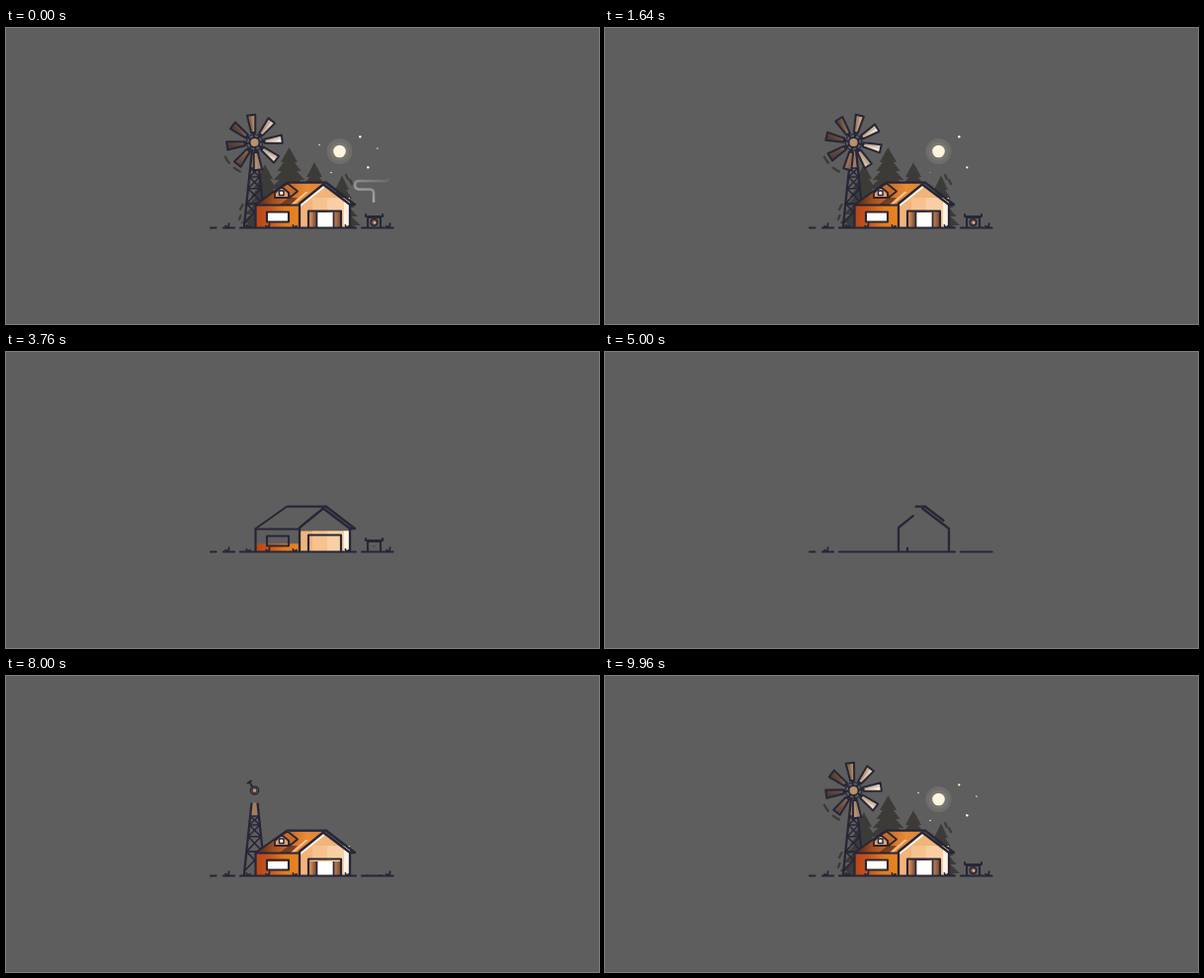
These frames come from a looping animation (600 by 300 pixels, 10000 ms). An HTML page with a canvas:

```html
<!DOCTYPE html>
<html>
<head>
<meta charset="utf-8">
<style>
html, body { margin: 0; width: 100%; height: 100%; overflow: hidden; background: #5e5e5e; }
canvas { display: block; }
</style>
</head>
<body>
<canvas id="stage" width="600" height="300"></canvas>
<script>
const ctx = document.getElementById('stage').getContext('2d');
const INK = '#272638', SHADE = '#3c3b38', BG = '#5e5e5e', CREAM = '#fff4e3';
const BASE = 202, EAVE = 179, RIDGE = 156.7;         // heights
const LEFT = 252.5, CORNER = 297, PEAK = 322, RIGHT = 348; // house columns
const HUB = { x: 251.5, y: 116 };
let t = 0;

const ramp = (start, dur) => {
  const x = Math.max(0, Math.min(1, (t - start) / dur));
  return x * x * (3 - 2 * x);
};

// Presence of a part: the loop first clears the scene, then builds it again
const shown = (enter, leave, dur = .5, leaveDur = dur) =>
  t < 6 ? 1 - ramp(leave, leaveDur) : ramp(enter, dur);

function trace(points) {
  ctx.beginPath();
  points.forEach(([x, y]) => ctx.lineTo(x, y));
}

function line(points, p = 1, width = 2.2, color = INK) {
  if (p <= 0) return;
  const len = points.slice(1).reduce((sum, [x, y], i) =>
    sum + Math.hypot(x - points[i][0], y - points[i][1]), 0);
  ctx.setLineDash(p < 1 ? [len * p, len * 2] : []);
  ctx.strokeStyle = color;
  ctx.lineWidth = width;
  trace(points);
  ctx.stroke();
  ctx.setLineDash([]);
}

function fill(points, color) {
  ctx.fillStyle = color;
  trace(points);
  ctx.fill();
}

function disc(x, y, r, color) {
  ctx.fillStyle = color;
  ctx.beginPath();
  ctx.arc(x, y, r, 0, 7);
  ctx.fill();
}

const box = (x, y, w, h) => [[x, y], [x + w, y], [x + w, y + h], [x, y + h], [x, y]];

function across(x1, x2, ...colors) {
  const g = ctx.createLinearGradient(x1, 0, x2, 0);
  colors.forEach((c, i) => g.addColorStop(i / (colors.length - 1), c));
  return g;
}

// Shows a drawing from the ground up to a share of its height
function wipe(p, top, draw) {
  if (p <= 0) return;
  ctx.save();
  ctx.beginPath();
  ctx.rect(0, BASE + 1 - (BASE + 1 - top) * p, 600, 300);
  ctx.clip();
  draw();
  ctx.restore();
}

function tree(x, top, width, p) {
  if (p <= 0) return;
  ctx.save();
  ctx.beginPath();
  ctx.rect(0, 0, 600, BASE);
  ctx.clip();
  ctx.translate(x, top + (BASE - top) * (1 - p));
  for (let y = 0, w = width; top + y < BASE; y += 9, w += width * .42)
    fill([[0, y - w * .35], [w, y + 12], [-w, y + 12]], SHADE);
  ctx.restore();
}

function trees() {
  [[262, 141, 8], [286.5, 124, 8.5], [312, 139, 8], [340, 152, 7]].forEach(([x, top, width], i) =>
    tree(x, top, width, shown(8.4 + .05 * Math.max(0, i * 2 - 2), 2.6 - .04 * i)));

  // Short marks around the wheel and beside the outer trees
  const p = shown(9.5, 2.45, .35);
  for (let i = 0; i < 2; i++) {
    const a = 2.68 - i * .43, end = a - .22 * p;
    if (p > 0) {
      ctx.strokeStyle = SHADE;
      ctx.lineWidth = 2.3;
      ctx.beginPath();
      ctx.arc(HUB.x, HUB.y, 33, end, a);
      ctx.stroke();
    }
    line([[239.5 - 2 * i, 179 + 11 * i], [237 - i, 184 + 10 * i]], p, 2.2, SHADE);
    line([[344 + 4 * i, 149 + 5 * i], [346 + 4 * i, 153 + 5 * i]], p, 2.2, SHADE);
  }
}

function sky() {
  const m = shown(8.95, 2.7);
  disc(337.5, 125, 13 * m, 'rgba(255,245,215,.10)');
  disc(337.5, 125, 9.6 * m, 'rgba(255,245,215,.07)');
  disc(337.5, 125, 6.3 * m, '#fcf4de');
  [[375.8, 122], [317, 118.5], [329, 146.5], [366.3, 141.3], [358.3, 110.3]].forEach(([x, y], i) =>
    disc(x, y, (i > 2 ? 1.2 : .75) * shown(9.2 + i * .08, .1 + .45 * i, .5, 1.3), '#fff8e6'));
}

function smoke() {
  const path = new Path2D('M372 187V167Q372 163.500 368 163.500H358Q353 163.500 353 159T358 155H383Q388 155 388 150T383 145H365');
  const len = 100;
  const head = t < 6 ? 1 : ramp(8.54, .55);
  const tail = t < 6 ? .05 + .95 * ramp(-.1, .7) : ramp(8.95, .55);
  if (head <= tail) return;
  ctx.setLineDash([len * (head - tail), 300]);
  ctx.lineDashOffset = -len * tail;
  const g = ctx.createLinearGradient(364, 187, 378, 147);
  ['#b4b4b4', '#a6a6a6', '#888888', BG].forEach((c, i) => g.addColorStop(i / 3, c));
  ctx.strokeStyle = g;
  ctx.lineWidth = 2.5;
  ctx.lineCap = 'butt';
  ctx.stroke(path);
  ctx.lineCap = 'round';
  ctx.setLineDash([]);
  ctx.lineDashOffset = 0;
}

function tower() {
  const leg = (side, y) => [HUB.x + side * (2.5 + (y - 124) * .105), y];
  wipe(shown(7.6, 3.2), 120, () => {
    fill([leg(-1, 124), leg(1, 124), leg(1, 142), leg(-1, 142)], '#a27d5b');
    for (const side of [-1, 1]) line([leg(side, BASE), leg(side, 124)], 1, 2.3);
    for (let y = 142, h = 9; y < 195; y += h, h *= 1.3) {
      const next = Math.min(y + h, BASE);
      line([leg(-1, y), leg(1, y), leg(-1, next)], 1, 1.6);
      line([leg(-1, y), leg(1, next)], 1, 1.6);
    }
  });
}

function wheel() {
  const turn = (-7 + 12.2 * (t > 6 ? t - 10 : t)) * Math.PI / 180;
  const wood = across(223, 280, '#4a3b33', '#684f41', '#b08a68', '#e0c8ac', '#fbf6f0');
  for (let i = 0; i < 8; i++) {
    const p = shown(8 + i * .025, 2.6 + i * .025, .33);
    if (p <= 0) continue;
    const a = turn + i * Math.PI / 4, c = Math.cos(a), s = Math.sin(a);
    const at = (x, y) => [HUB.x + x * c + y * s, HUB.y + x * s - y * c];
    const out = 10 + 18 * p, w = 2 + 2.2 * p;
    const blade = [at(-2, 10), at(-w, out), at(w, out), at(2, 10), at(-2, 10)];
    fill(blade, wood);
    fill([at(-2, 10), at(-w, out), at(0, out), at(0, 10)], 'rgba(50,38,40,.18)');
    line(blade, 1, 2);
    line([at(0, 5), at(0, 10)], 1, 2);
  }
  const h = shown(7.75, 2.85);
  if (h <= 0) return;
  ctx.strokeStyle = INK;
  ctx.lineWidth = 1.3;
  ctx.beginPath();
  ctx.arc(HUB.x, HUB.y, 8.3 * h, 0, 7);
  ctx.stroke();
  disc(HUB.x, HUB.y, 5.8 * h, INK);
  disc(HUB.x, HUB.y, 4 * h, '#b8926b');
}

function dormer() {
  const front = [[272, 172], [272, 167], [279, 161], [286, 167], [286, 172], [272, 172]];
  const side = [[279, 161], [285, 157.5], [295, 165.5], [287, 172], [286, 167]];
  fill(side, '#c96a28');
  fill(front, '#e7a267');
  line(front, 1, 1.8);
  line(side, 1, 1.8);
  fill(box(276.5, 165, 4.5, 4.5), '#fffaf0');
  line(box(276.5, 165, 4.5, 4.5), 1, 1.5);
}

function house() {
  const slope = [[CORNER, 178], [PEAK - 1, 158.5]];
  const far = [[RIGHT, BASE], [RIGHT, EAVE], [PEAK - 1, 158.5]];
  const roof = [[CORNER, EAVE], [LEFT, EAVE], [284, RIDGE], [PEAK, RIDGE]];

  wipe(shown(7.45, 3.5), RIDGE, () => {
    fill([[CORNER, BASE], ...slope, [RIGHT, EAVE], [RIGHT, BASE]], '#f1b47a');
    ['#f6c28e', '#f9cfa3'].forEach((c, i) => fill(box(310 + 15 * i, 172, 15 + 8 * i, BASE - 172), c));
    fill(box(342, 176, RIGHT - 342, BASE - 176), CREAM);
    fill([...slope, [PEAK, 162], [CORNER, 182]], CREAM);
  });
  wipe(shown(7.55, 3.4), RIDGE, () => {
    fill(box(LEFT, EAVE, CORNER - LEFT, BASE - EAVE), across(LEFT, CORNER, '#b4451c', '#c9571b', '#e27c1e', '#e88422'));
    fill(roof, across(254, PEAK, '#4f2a1c', '#a5501d', '#d06c25', '#e68c38', '#dd8232'));
    fill([[277, EAVE], [286, 172], [295, 172], [288, EAVE]], 'rgba(70,34,24,.6)');
    fill([[288, EAVE], [303, 166], [306, 166], [292, EAVE]], 'rgba(255,235,205,.6)');
    dormer();
  });
  wipe(shown(7.65, 3.2), 184, () => {
    fill(box(264, 186.5, 22, 10), '#fffdf8');
    fill(box(306, 185.5, 33, 16.5), across(306, 339, '#f0a566', '#6b432f', '#8a5638', '#c98a5a', '#7a4a32'));
    fill(box(315, 187, 17, 15), '#ffffff');
    for (const x of [314.5, 331.5]) line([[x, 187], [x, BASE]], 1, 1.7);
  });

  line([[CORNER, 179.5], [LEFT, 179.5], [LEFT, BASE]], shown(7.4, 4));
  line(roof.slice(1, 3), shown(7.45, 4), 2);
  line(box(264, 186.5, 22, 10), shown(7.45, 3.9), 2.1);
  line([[306, BASE], [306, 185.5], [339, 185.5], [339, BASE]], shown(7.1, 4.57), 2.2);
  line([[CORNER, BASE], ...slope], shown(6.7, 4.85), 2.3);
  line(far, shown(6.55, 5.05), 2.3);
  line([[324, RIDGE], [285, RIDGE]], shown(6.98, 4.66));
  line([[324, RIDGE], [353, EAVE], [RIGHT, EAVE]], shown(6.88, 4.77), 2.4);
}

function firepit() {
  wipe(shown(7.9, 4.02), 187, () => {
    line([[366, BASE], [366, 192], [379, 192], [379, BASE]], 1, 2.1);
    line([[364, 189], [364, 191], [381, 191], [381, 189]], 1, 2.1);
  });
  const glow = shown(8.1, 3.5, .4);
  disc(372.5, 197, 4 * glow, INK);
  disc(372.5, 197, 2.5 * glow, '#8a5a48');
  disc(373, 197.3, 1.1 * glow, '#ecd6c0');
}

function ground() {
  [[207, 212.5], [220, 231], [237, 354], [360, 391.5]].forEach(([from, to], i) =>
    line([[from, 202.5], [to, 202.5]], shown(6.42 + i * .04, 5.26 - i * .03)));
  [225, 266, 388, 244, 291, 344].forEach((x, i) => {
    const lean = i < 3 ? 1 : -1;
    const p = shown(6.7 + i * .03, i ? 4.4 + i * .03 : 5.05, .3);
    line([[x, BASE], [x + .6 * lean, BASE - 3 - .8 * lean]], p, 1.8);
    line([[x - lean, BASE], [x - 3 * lean, BASE - 1.3]], p, 1.8);
  });
}

const start = performance.now();
function loop() {
  t = (performance.now() - start) / 1000 % 10;
  ctx.fillStyle = BG;
  ctx.fillRect(0, 0, 600, 300);
  ctx.lineCap = ctx.lineJoin = 'round';
  [trees, sky, smoke, tower, house, firepit, ground, wheel].forEach(draw => draw());
  requestAnimationFrame(loop);
}
loop();
</script>
</body>
</html>
```
